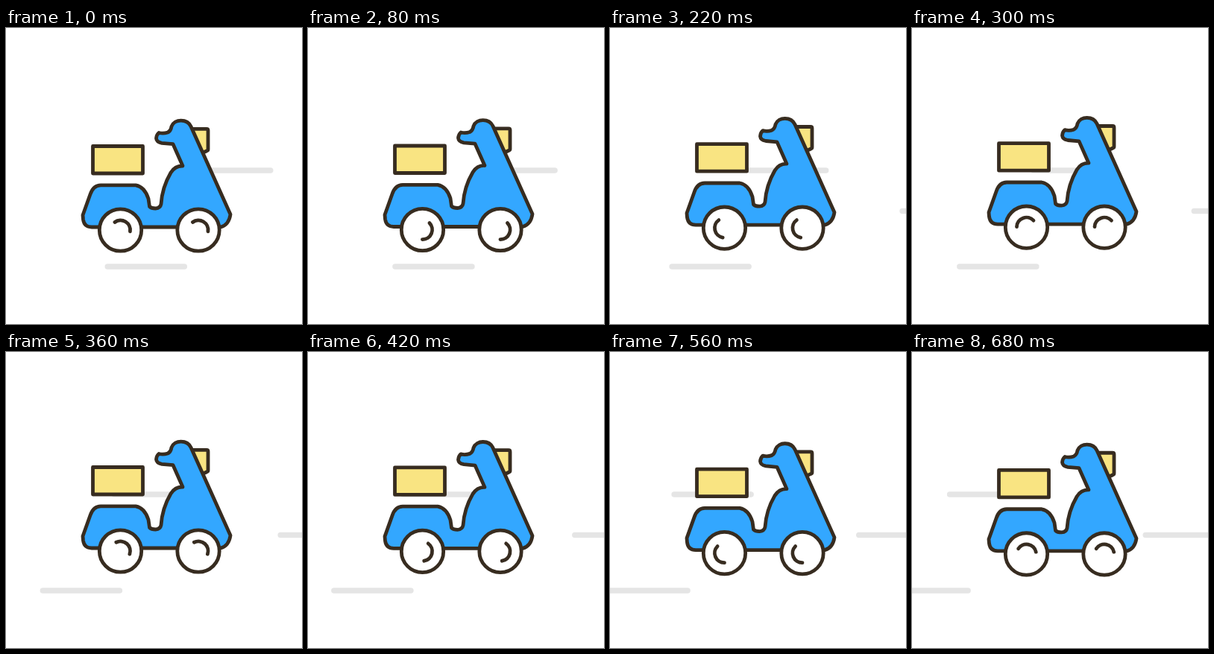
Recreate the animation shown at these times as an HTML page. Size 397x397 px, loop 700 ms.

```html
<!DOCTYPE html>
<html lang="en">
<head>
<meta charset="utf-8">
<title>Scooter</title>
<style>
  html, body { margin: 0; width: 100%; height: 100%; overflow: hidden; background: #fff; }
  svg { display: block; width: 100%; height: 100%; }
  .streak { stroke: #e5e5e5; stroke-width: 7.5; stroke-linecap: round; }
  #scooter { stroke: #372c20; stroke-width: 4.8; stroke-linejoin: round; stroke-linecap: round; }
</style>
</head>
<body>
<svg viewBox="0 0 397 397">
  <path class="streak" d="M252 191h103"/>
  <path class="streak" d="M430 245.5h103"/>
  <path class="streak" d="M136.500 320h103"/>
  <g id="scooter">
    <path fill="#f9e482" d="M116.500 158.500h67v36.500h-67z"/>
    <path fill="#f9e482" d="M245 135.300h24q2 0 2 2v25.500q0 1.500-1.500 2l-5.500 2.500h-19z"/>
    <path fill="#33a7ff" d="M115 267Q105 267 103.500 257L103 251L113 223Q117 211 127 210.800H174Q186 213 191 229L192.500 239.500
      Q195 242 200.500 242Q207 241.500 208 236C209 221 214 206 221 194Q227 184.500 237 185L224 155.700L209 154.300Q202 153 201.500 148
      Q202 143 205 140.500Q211 142 217 140Q221 138 222 132C226 121.500 243 121.500 248 132L301 250Q299 264 288 267Z"/>
    <g id="wheels" fill="#fff"></g>
  </g>
</svg>
<script>
  const LOOP = 700;
  const streaks = [...document.querySelectorAll('.streak')];
  const travel = [207, 120, 169];
  const scooter = document.getElementById('scooter');
  const wheels = document.getElementById('wheels');

  wheels.innerHTML = [153.5, 258].map(x => `
    <g transform="translate(${x} 271)">
      <circle r="28.2"/>
      <path class="glint" fill="none" d="M5.1-12A13 13 0 0 1 5.1 12"/>
    </g>`).join('');
  const glints = [...wheels.querySelectorAll('.glint')];

  function draw(now) {
    const p = now % LOOP / LOOP;
    const bob = 2 * (Math.cos(2 * Math.PI * p) - 1);
    scooter.setAttribute('transform', `translate(0 ${bob})`);
    streaks.forEach((s, i) => s.setAttribute('transform', `translate(${-travel[i] * p} 0)`));
    glints.forEach(g => g.setAttribute('transform', `rotate(${720 * p - 60})`));
    requestAnimationFrame(draw);
  }
  draw(0);
</script>
</body>
</html>
```
